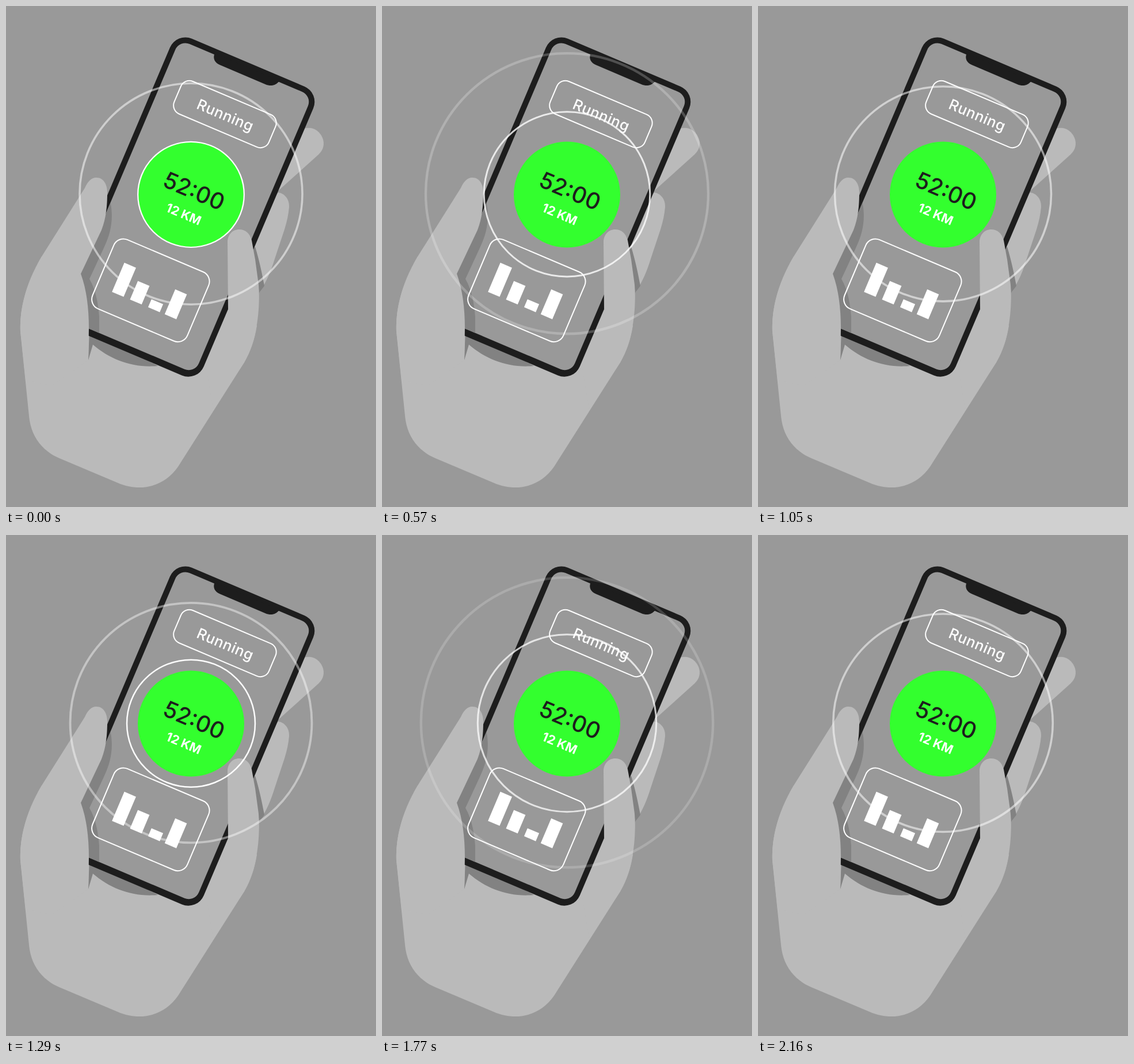
These frames come from a looping animation (643 px wide and 870 px high, 2.19 s). An HTML page:

```html
<!DOCTYPE html>
<html lang="en">
<head>
<meta charset="utf-8">
<title>Running tracker</title>
<style>
  html, body { margin: 0; width: 100%; height: 100%; overflow: hidden; background: #999; }
  svg { display: block; width: 100vw; height: 100vh; }
  text { font-family: Inter, Roboto, sans-serif; text-anchor: middle; }
  .skin { fill: #bababa; }
  .shade { fill: #828282; }
  .ink { fill: #1d1d1d; }
  .white { fill: #fff; }
  .line { fill: none; stroke: #fff; stroke-width: 2; }
</style>
</head>
<body>
<svg viewBox="0 0 643 870">
  <defs>
    <clipPath id="screen">
      <rect x="300.5" y="-64" width="250.5" height="523.3" rx="19" transform="rotate(23)"/>
    </clipPath>
  </defs>

  <!-- fingers and palm behind the phone -->
  <path class="skin" d="M505 220C514 213 521 211 530 212C542 214 552 226 552 239C552 247 548 253 543 258L474 320L440 330Z"/>
  <path class="skin" d="M455 340L473 324C484 325 493 336 492 349C491 362 488 375 484 388L467 439C461 459 453 478 441 497L420 440Z"/>
  <path class="shade" d="M428 424L433 418C440 441 445 465 449 486L440 498Z"/>
  <path class="skin" d="M62 435C38 476 23 521 25 565L40 712C43 746 62 772 92 785L194 828C233 845 275 835 299 800L414 619C425 600 432 580 436 555L386 528L300 560L130 465Z"/>
  <path class="shade" d="M143 615L151 588C181 614 220 629 264 625L145 560Z"/>

  <!-- phone -->
  <g transform="rotate(23)">
    <rect class="ink" x="290.5" y="-74" width="270.5" height="545" rx="29"/>
    <rect x="300.5" y="-64" width="250.5" height="523.3" rx="19" fill="#999"/>
    <path class="ink" d="M366-66C366-56 373-51 382-51H468C478-51 486-56 488-66Z"/>
  </g>
  <path class="shade" clip-path="url(#screen)" d="M176 325C184 342 185 362 183 378C181 396 174 412 165 431L145 474C155 491 160 513 162 540V571L140 568L120 465Z"/>

  <!-- screen content -->
  <g transform="rotate(23)">
    <rect class="line" x="334.2" y="-6.3" width="178.8" height="61.3" rx="16"/>
    <rect class="line" x="334.8" y="291.2" width="179" height="130.3" rx="18"/>
    <text class="white" x="425" y="34.6" font-size="25.6" font-weight="500" letter-spacing=".6">Running</text>
    <g class="white" id="bars"></g>
  </g>

  <!-- thumb and finger over the phone -->
  <path class="skin" d="M62 435L137 316C142 305 148 298 157 298C169 298 176 309 176 324C176 346 174 369 166 389L130 465C141 495 144 529 144 560L143 615L80 660L34 650L25 565C23 521 38 476 62 435Z"/>
  <path class="skin" d="M385 410C385 397 394 388 405 388C416 388 424 395 427 407L433 440L439 484C441 510 439 540 434 564C430 584 424 601 414 619L360 700L347 622L386 528Z"/>

  <ellipse cx="321.5" cy="327.5" rx="92.5" ry="92" fill="#33ff2e"/>
  <g id="rings"></g>
  <g transform="rotate(23)">
    <text class="ink" x="426.6" y="182" font-size="39.5" font-weight="500">52:00</text>
    <text class="white" x="425.5" y="219.8" font-size="21.7" font-weight="700">12 KM</text>
  </g>
</svg>
<script>
const LOOP = 2190, STEP = 30, SPEED = 0.0912;
const START_R = 92.3, FADE_R = 284;

function add(parent, tag, attrs) {
  const el = document.createElementNS("http://www.w3.org/2000/svg", tag);
  set(el, attrs);
  return document.getElementById(parent).appendChild(el);
}
function set(el, attrs) {
  for (const key in attrs) el.setAttribute(key, attrs[key]);
}

[[363.5, 55], [397.5, 35], [431.7, 15], [463, 47]].forEach(([x, height]) =>
  add("bars", "rect", { x, y: 385 - height, width: 22, height }));

// Two rings half a loop apart, growing steadily while they fade.
const rings = [0, 1110].map(offset => ({
  offset,
  el: add("rings", "ellipse", { cx: 321.5, fill: "none", stroke: "#fff" })
}));

function draw(time) {
  for (const { offset, el } of rings) {
    const r = START_R + SPEED * ((time + offset) % LOOP);
    set(el, {
      rx: r,
      ry: r * 0.992,
      cy: 328.5 - r * 0.0115, // the centre drifts up as the ring grows
      "stroke-width": 1 + r * 0.0135,
      opacity: Math.max(0, Math.min(1, (FADE_R - r) / 175))
    });
  }
}

const start = performance.now();
function tick() {
  const time = (performance.now() - start) % LOOP;
  draw(Math.floor(time / STEP) * STEP);
  requestAnimationFrame(tick);
}
draw(0);
requestAnimationFrame(tick);
</script>
</body>
</html>
```
